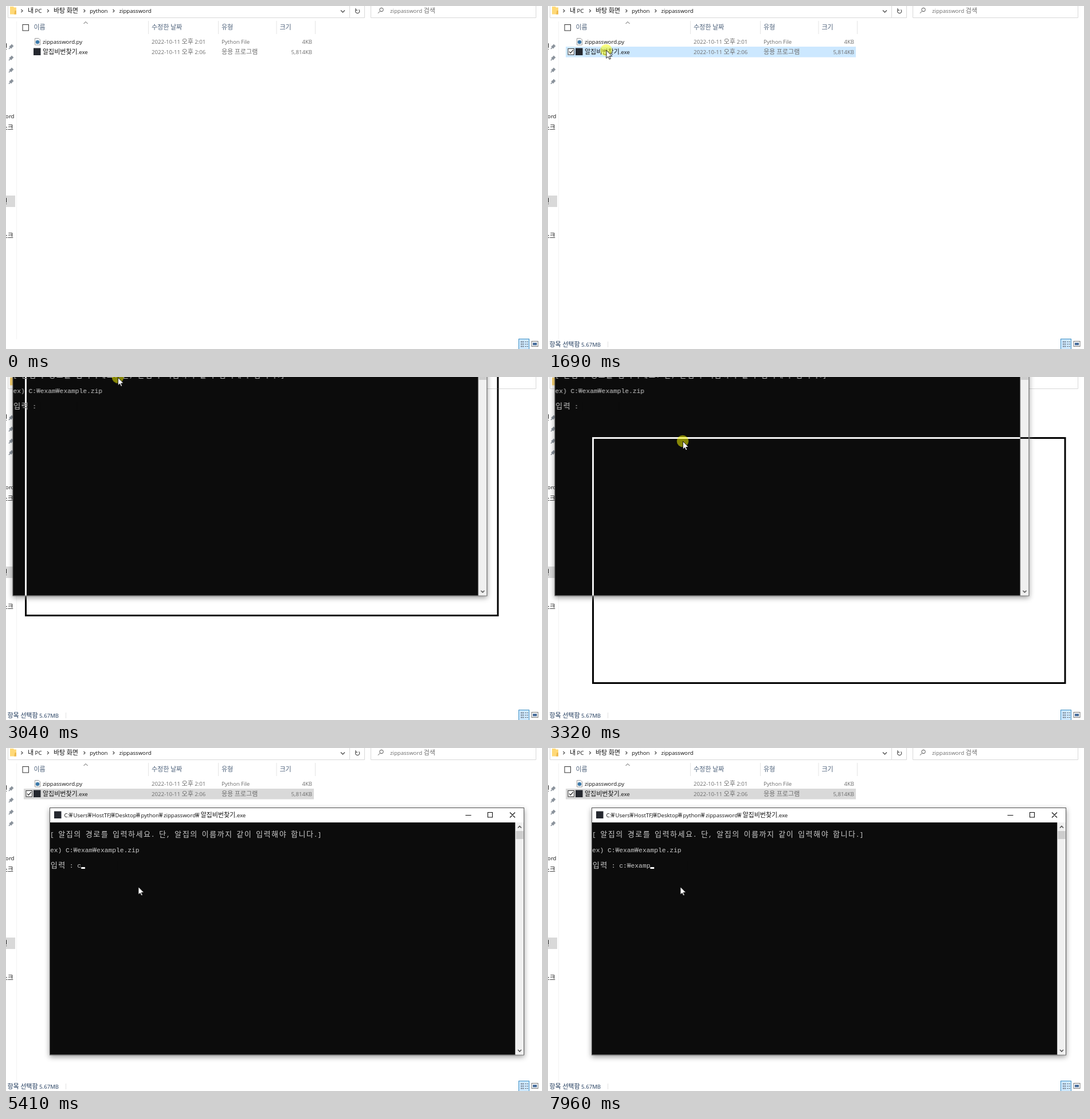
An HTML page for the animation above (8000 ms loop, 935x599 px).

```html
<!DOCTYPE html>
<html lang="ko">
<head>
<meta charset="utf-8">
<title>zippassword</title>
<style>
html, body { margin: 0; width: 100%; height: 100%; overflow: hidden; background: #fff; }
svg { display: block; width: 100vw; height: 100vh; }
text { font: 9.6px "Open Sans", "Noto Sans CJK KR", "Noto Sans CJK", sans-serif; fill: #111; }
.k { font-size: 11px; font-family: "Noto Sans CJK KR", "Noto Sans CJK", sans-serif; }
.w { font-size: 10px; font-family: "Noto Sans Mono", monospace; }
.dim text, text.dim { fill: #6d6d6d; }
.head text { fill: #4c607a; }
.end { text-anchor: end; }
.con text { font: 11.27px "Liberation Mono", "Noto Sans CJK KR", monospace; fill: #ccc; }
.con .k { font-size: 13px; font-weight: 300; }
.con .w { font-size: 11.27px; }
.line { fill: none; stroke: #555; }
.edge { fill: #fff; stroke: #d9d9d9; }
.box { fill: #fff; stroke: #333; }

.anim { animation: 8s step-end -12ms infinite; }
#row1 { animation-name: row1; }
#row2 { animation-name: row2; }
#tick1 { animation-name: tick1; }
#tick2 { animation-name: tick2; }
#check, #status { animation-name: picked; }
#win { animation-name: win; }
#frame { filter: drop-shadow(0 3px 5px rgba(0,0,0,.4)); }
#lines { animation-name: lines; }
#title { animation-name: title; }
.mark { animation-name: mark; }
#type { animation-name: type; }
#caret { animation-name: caret; }
#ghost { animation-name: ghost; mix-blend-mode: difference; }
#mouse { animation-name: mouse; }
#ring { animation-name: ring; }

@keyframes row1 {
  0%, 14.375%, 100% { fill: #fff; }
  11%, 13.5% { fill: #e5f3ff; }
}
@keyframes row2 {
  0%, 11% { fill: #fff; }
  10%, 14.375% { fill: #e5f3ff; }
  19.375% { fill: #cce8ff; }
  22.125%, 100% { fill: #d9d9d9; }
}
@keyframes tick1 {
  0%, 14.375%, 100% { opacity: 0; }
  11% { opacity: 1; }
}
@keyframes tick2 {
  0%, 11% { opacity: 0; }
  10%, 14.375%, 100% { opacity: 1; }
}
@keyframes picked {
  0% { opacity: 0; }
  19.375%, 100% { opacity: 1; }
}
@keyframes win {
  0% { opacity: 0; transform: translate(-64.5px, -154px); }
  22.125% { opacity: 1; transform: translate(-64.5px, -154px); }
  44%, 100% { opacity: 1; transform: none; }
}
@keyframes lines {
  0% { opacity: 0; }
  35.5%, 100% { opacity: 1; }
}
@keyframes title {
  0%, 67.625%, 100% { transform: none; }
  56% { transform: translateX(24px); }
}
@keyframes mark {
  0%, 67.625%, 100% { opacity: 0; }
  56% { opacity: 1; }
}
@keyframes type {
  0% { transform: none; }
  67.625% { transform: translateX(6.76px); }
  73.5% { transform: translateX(13.52px); }
  81% { transform: translateX(20.28px); }
  91.875% { transform: translateX(27.04px); }
  94.375% { transform: translateX(33.8px); }
  96.125% { transform: translateX(40.56px); }
  97% { transform: translateX(47.32px); }
  99.5%, 100% { transform: translateX(54.08px); }
}
/* every key press shows the caret again until the next blink */
@keyframes caret {
  0%, 49.75%, 62.625%, 68.5%, 76%, 81.875%, 95.25% { opacity: 0; }
  44%, 56%, 67.625%, 73.5%, 81%, 88.5%, 96.125%, 100% { opacity: 1; }
}
@keyframes ghost {
  0% { opacity: 0; transform: translate(-60px, -146px); }
  36.375% { opacity: 1; transform: translate(-60px, -146px); }
  37.25% { opacity: 1; transform: translate(-53px, -134px); }
  38% { opacity: 1; transform: translate(-44px, -118px); animation-timing-function: steps(4); }
  41.5% { opacity: 1; transform: none; }
  44%, 100% { opacity: 0; transform: none; }
}
@keyframes mouse {
  0% { transform: translate(700px, 700px); }
  2.25% { transform: translate(616px, 498px); animation-timing-function: steps(2); }
  4% { transform: translate(425px, 339px); animation-timing-function: steps(2); }
  5.7% { transform: translate(280px, 218px); animation-timing-function: steps(2); }
  7.4% { transform: translate(185px, 139px); animation-timing-function: steps(2); }
  9.125% { transform: translate(126px, 90px); animation-timing-function: steps(3); }
  11.75% { transform: translate(100px, 67px); }
  12.625% { transform: translate(99px, 69px); }
  13.5% { transform: translate(99px, 70px); }
  14.375% { transform: translate(100px, 73px); }
  15.25% { transform: translate(101.5px, 77px); }
  22.875% { transform: translate(118px, 52px); }
  23.75% { transform: translate(147px, 5px); }
  24.5% { transform: translate(162px, -25px); }
  29.625% { transform: translate(163px, -16px); }
  30.5% { transform: translate(163px, -15px); }
  31.375% { transform: translate(163px, -16px); }
  32.25% { transform: translate(163px, -30px); }
  35.5% { transform: translate(174px, -36px); }
  36.375% { transform: translate(178px, -28px); }
  37.25% { transform: translate(186px, -16px); }
  38% { transform: translate(195px, .5px); animation-timing-function: steps(4); }
  41.5% { transform: translate(235px, 112px); }
  45.625% { transform: translate(233px, 112px); }
  48.875% { transform: translate(237px, 120px); animation-timing-function: steps(2); }
  50.625% { transform: translate(242px, 175px); animation-timing-function: steps(2); }
  52.375% { transform: translate(238px, 225px); animation-timing-function: steps(2); }
  54.125%, 100% { transform: translate(230.5px, 242px); }
}
@keyframes ring {
  0%, 20.25%, 22.875%, 44%, 56.875%, 100% { opacity: 0; }
  19.375%, 21.125%, 35.5%, 56% { opacity: 1; }
}
</style>
</head>
<body>
<svg viewBox="0 0 935 599">
  <defs>
    <path id="next" d="M-1.5 -2.5 1 0 -1.5 2.5" fill="none" stroke="#444" stroke-width="1.1"/>
    <path id="pin" d="M-4 4 -1.2 1.2 M-3 -.8 .8 3 M-1.6 -.6 1.2 -3 M.6 1.6 3 -1.2 M.4 -3.8 3.8 -.4 M-.6 .4 2 -2" fill="none" stroke="#8b939c" stroke-width="1.7"/>
    <rect id="app" width="12.5" height="12.5" fill="#25282f"/>
  </defs>
  <rect width="935" height="599" fill="#fff"/>

  <!-- address bar -->
  <path class="edge" d="M3.5 -5V20.5H625.5V-5M599.5 -5V20.5M636.5 -5V20.5H924.5V-5"/>
  <path d="M7 1H13L14 2.5H18V14.5H7Z" fill="#ffd977"/>
  <path d="M15.5 8H18V14.5H14Z" fill="#eebb50"/>
  <use href="#next" x="28" y="8.5"/><use href="#next" x="73.5" y="8.5"/>
  <use href="#next" x="137" y="8.5"/><use href="#next" x="188" y="8.5"/>
  <text x="38" y="12">내 PC</text>
  <text x="83" y="12">바탕 화면</text>
  <text x="146" y="12">python</text>
  <text x="197.5" y="12">zippassword</text>
  <path class="line" d="M584 7.5 587.5 11 591 7.5" stroke-width="1.5"/>
  <path class="line" d="M611 6.2A3.6 3.6 0 1 0 615.5 6.4M610 4V7.3H613.2" stroke-width="1.2"/>
  <circle class="line" cx="655" cy="6.5" r="3.2"/>
  <path class="line" d="M652.6 9 648.8 12.6"/>
  <text class="dim" x="670" y="12">zippassword 검색</text>

  <!-- side panel -->
  <path d="M18.5 27V582" stroke="#f3f3f3"/>
  <rect y="331" width="16" height="20" fill="#d9d9d9"/>
  <g class="end">
    <text x="2.5" y="75">바탕 화면</text>
    <text x="14.5" y="195.5">zippassword</text>
    <text x="13" y="216">디스크</text>
    <text x="2.5" y="345">바탕 화면</text>
    <text x="13" y="405">디스크</text>
  </g>
  <use href="#pin" x="9" y="71"/><use href="#pin" x="9" y="91"/>
  <use href="#pin" x="9" y="112"/><use href="#pin" x="9" y="132"/>

  <!-- file list -->
  <g class="head">
    <path d="M248.5 26V49M370.5 26V49M472 26V49M539.5 26V49" stroke="#e5e5e5"/>
    <rect class="box" x="29" y="32.5" width="10.5" height="10.5"/>
    <path class="line" d="M135.5 31 139 27.5 142.5 31"/>
    <text x="48.5" y="41">이름</text>
    <text x="254" y="41">수정한 날짜</text>
    <text x="376" y="41">유형</text>
    <text x="477.5" y="41">크기</text>
  </g>
  <rect id="row1" class="anim" x="31" y="53" width="506" height="18" fill="#fff"/>
  <rect id="row2" class="anim" x="31" y="71" width="506" height="18.5" fill="#fff"/>
  <rect id="tick1" class="anim box" x="35" y="57" width="10.5" height="10.5"/>
  <rect id="tick2" class="anim box" x="35" y="74.5" width="10.5" height="10.5"/>
  <path id="check" class="anim" d="M37 79.7 39.3 82.2 43.8 77" fill="none" stroke="#222" stroke-width="1.2"/>
  <path d="M50.5 56.5H57L59.5 59V68H50.5Z" fill="#fff" stroke="#9a9a9a"/>
  <circle cx="55" cy="63" r="3.3" fill="#3b78a8"/>
  <use href="#app" x="48" y="73.5"/>
  <text x="64" y="65.5">zippassword.py</text>
  <text x="64" y="83.5">알집비번찾기.exe</text>
  <g class="dim">
    <text x="254" y="65.5">2022-10-11 오후 2:01</text>
    <text x="254" y="83.5">2022-10-11 오후 2:06</text>
    <text x="376" y="65.5">Python File</text>
    <text x="376" y="83.5">응용 프로그램</text>
    <text class="end" x="534" y="65.5">4KB</text>
    <text class="end" x="534" y="83.5">5,814KB</text>
  </g>

  <!-- status bar -->
  <g id="status" class="anim">
    <text x="2.5" y="594.5" style="fill:#1e395b">항목 선택함 5.67MB</text>
    <path d="M104.5 586V596" stroke="#e3e3e3"/>
  </g>
  <rect x="894.5" y="581.5" width="18" height="19" fill="#cce8ff" stroke="#3c8fc4"/>
  <path d="M898 586.5H903M898 590.5H903M898 594.5H903" stroke="#68707a" stroke-width="2" stroke-dasharray="2 1"/>
  <path d="M905 586.5H911M905 590.5H911M905 594.5H911" stroke="#68707a" stroke-dasharray="2.5 1"/>
  <rect x="917" y="585.5" width="11" height="9" fill="#fff" stroke="#777"/>
  <path d="M919 588H926V592.5H919Z" fill="#4a6f9c"/>

  <!-- console window -->
  <g id="win" class="anim">
    <rect id="frame" x="76.5" y="104.5" width="827" height="431.5" fill="#fff" stroke="#555"/>
    <use href="#app" x="84" y="110.5"/>
    <text class="mark anim" x="101" y="120.5">선택</text>
    <text id="title" class="anim" y="120.5"><tspan x="101.5">C:₩</tspan><tspan x="117.5">Users₩</tspan><tspan x="150">HostTFJ₩</tspan><tspan x="190.5">Desktop₩</tspan><tspan x="235.5">python₩</tspan><tspan x="275">zippassword₩</tspan><tspan x="339.5">알집비번찾기.exe</tspan></text>
    <path d="M801.5 117.5H811.5M840.5 112.5H848.5V121H840.5ZM879 112.5 888 121.5M888 112.5 879 121.5" fill="none" stroke="#111" stroke-width="1.1"/>
    <rect x="77" y="130" width="811.5" height="405.5" fill="#0c0c0c"/>
    <rect x="888.5" y="130" width="14.5" height="405.5" fill="#f0f0f0"/>
    <rect x="889.5" y="145" width="13" height="14" fill="#cdcdcd"/>
    <path class="line" d="M893 139.5 896 136.5 899 139.5M893 527 896 530 899 527" stroke-width="1.6"/>
    <g id="lines" class="anim con">
      <text y="155">[ 알집의 경로를 입력하세요. 단, 알집의 이름까지 같이 입력해야 합니다.]</text>
      <text y="182">ex) C:₩exam₩example.zip</text>
      <text y="209">입력 : c:₩examp</text>
      <g id="type" class="anim">
        <rect x="124.3" y="197" width="64" height="16" fill="#0c0c0c"/>
        <rect id="caret" class="anim" x="124.3" y="208" width="6.76" height="3" fill="#fff"/>
      </g>
    </g>
    <rect class="mark anim" x="225.7" y="238" width="6.8" height="13.5" fill="#f2f2f2"/>
  </g>
  <rect id="ghost" class="anim" x="78.5" y="106.5" width="823.5" height="428" fill="none" stroke="#fff" stroke-width="3"/>

  <!-- pointer -->
  <g id="mouse" class="anim">
    <circle id="ring" class="anim" r="10.3" fill="#ff0" fill-opacity=".5"/>
    <path d="M.3 .3V14.3L3.5 11.3 5.6 16 7.8 15 5.7 10.5H10.2Z" fill="#fff" stroke="#000" stroke-width=".9"/>
  </g>
</svg>
<script>
const CELL = 6.76;
const isHangul = c => /[가-힣]/.test(c);

// Console characters sit on a fixed grid; Hangul takes two cells.
for (const line of document.querySelectorAll('.con text')) {
  let col = 0;
  const xs = [...line.textContent].map(c => {
    const x = 77 + col * CELL + (isHangul(c) ? 0.8 : 0);
    col += isHangul(c) ? 2 : 1;
    return x.toFixed(2);
  });
  line.setAttribute('x', xs.join(' '));
}

for (const t of document.querySelectorAll('text')) {
  t.innerHTML = t.innerHTML
    .replace(/[가-힣]+/g, '<tspan class="k">$&</tspan>')
    .replace(/₩/g, '<tspan class="w">₩</tspan>');
}
</script>
</body>
</html>
```
